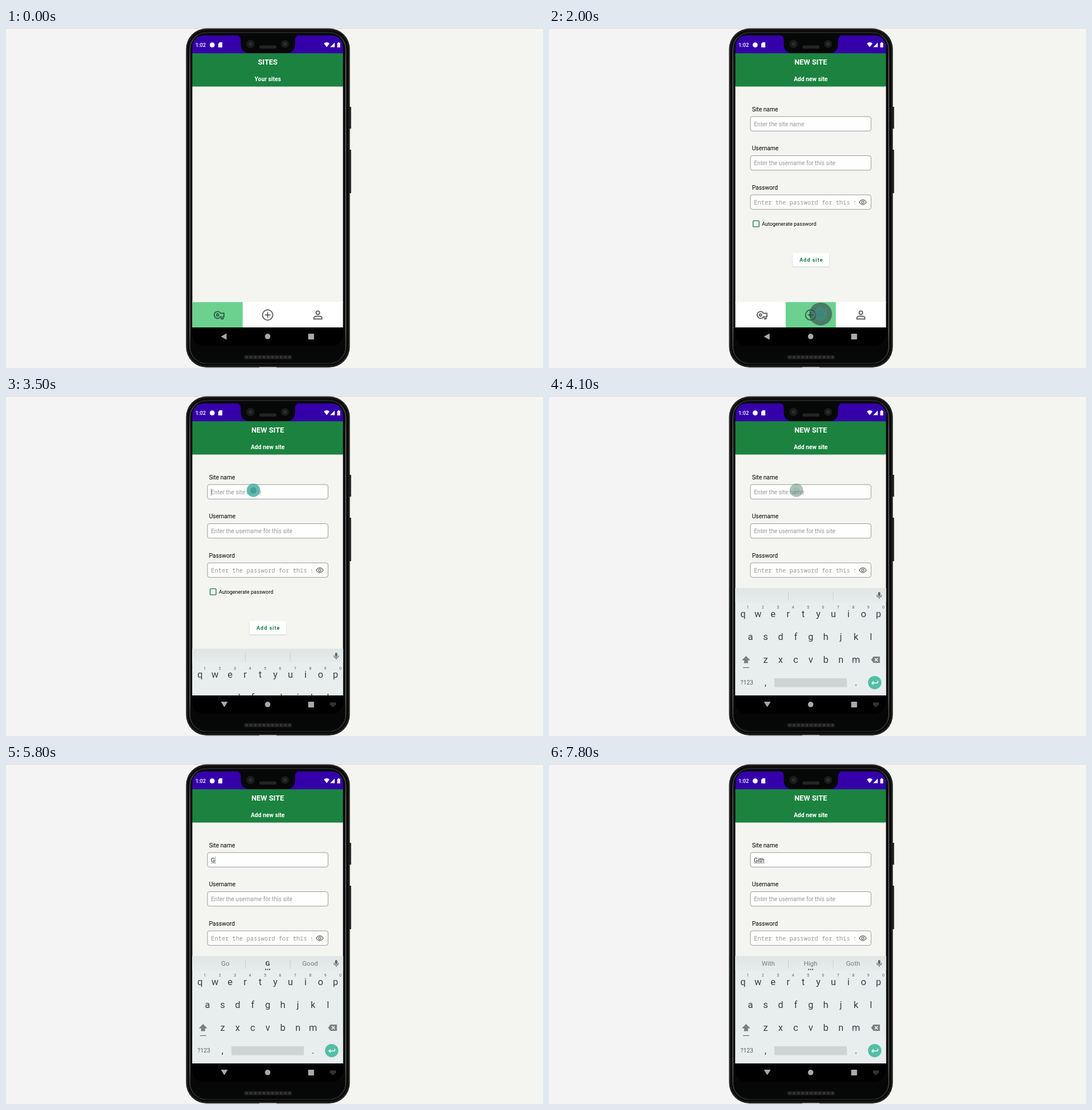
Animation of 941 by 595 pixels, one loop 8000 ms. Source, as an HTML page:

```html
<!DOCTYPE html>
<html lang="en">
<head>
<meta charset="utf-8">
<title>Adding a site</title>
<style>
  html, body { margin: 0; width: 100%; height: 100%; overflow: hidden; background: #f4f5f0; }
  svg { display: block; width: 941px; height: 595px; font-family: Roboto, sans-serif; }
  .mono { font-family: "Noto Sans Mono", monospace; }
  .icon { fill: none; stroke: #666867; stroke-width: 2; }
  .icon.active { stroke: #326246; }
</style>
</head>
<body>
<svg viewBox="0 0 941 595">
  <defs>
    <clipPath id="screenClip"><rect x="326.500" y="13" width="264" height="543" rx="20"/></clipPath>
    <clipPath id="contentClip"><path d="M326 103H591V524H326z"/></clipPath>
    <clipPath id="passwordClip"><path d="M355 294H536.500V316H355z"/></clipPath>
    <linearGradient id="strip" x2="0" y2="1">
      <stop stop-color="#e0e5e5"/><stop offset="1" stop-color="#e6ebeb"/>
    </linearGradient>
    <linearGradient id="rim" x2="0" y2="1">
      <stop stop-color="#3c3e3c"/><stop offset=".1" stop-color="#7d817d"/>
      <stop offset=".9" stop-color="#7d817d"/><stop offset="1" stop-color="#2a2c2a"/>
    </linearGradient>
  </defs>

  <path fill="#f4f4f4" d="M0 0H459V595H0z"/>
  <path fill="#d9d9d9" d="M0 0H941V1H0z"/>

  <g id="phone">
    <path fill="#222322" d="M602 138h2.700v38h-2.700zM602 213h2.700v76h-2.700z"/>
    <rect x="315.500" y=".7" width="287" height="593.300" rx="36" fill="#0a0b0a"/>
    <rect x="317" y="2.300" width="284" height="590" rx="34.500" fill="none" stroke="#2b2d2b" stroke-width="1.400"/>
    <rect x="322.300" y="8" width="273" height="579" rx="29" fill="#060707" stroke="url(#rim)" stroke-width="1.200"/>
    <rect x="417" y="572.500" width="84" height="7" rx="3" fill="#1d1e1d"/>
    <path d="M420 576H499" stroke="#343534" stroke-width="4" stroke-dasharray="4 3.500"/>
    <path fill="#eee" d="M444 593.500h30v1.500h-30z"/>
  </g>

  <g clip-path="url(#screenClip)">
    <path fill="#f4f5f1" d="M326 102H591V481H326z"/>
    <path fill="#3500aa" d="M326 13H591V45H326z"/>
    <path fill="#1b833f" d="M326 44.300H591V102.600H326z"/>
    <path fill="#000" d="M326 524H591V556H326z"/>
    <g id="statusIcons" fill="#fff">
      <circle cx="361.300" cy="29.600" r="4.400"/>
      <path d="M374.500 25h4.500v9h-7v-6.500z"/>
      <path d="M557 27q5-4 10 0l-5 6.500zM568 33.500l8-8v8zM580.500 26h1.500v-1h2v1h1.500v8h-5z"/>
    </g>
    <g id="headerText"></g>
    <g id="form"></g>
    <g id="tabs">
      <path fill="#fff" d="M326 479.600H591V524H326z"/>
      <rect id="activeTab" y="479.600" width="88" height="44.400" fill="#6bd18f"/>
      <g class="icon">
        <path d="M376.600 499.200A6 6 0 1 0 376.600 505.200H378V509H381V505.200H382.500V499.200z" transform="translate(-.6)"/>
        <circle cx="370.700" cy="502.200" r="2"/>
      </g>
      <g class="icon">
        <circle cx="458.500" cy="502.200" r="9"/>
        <path d="M453.500 502.200h10M458.500 497.200v10"/>
      </g>
      <g class="icon">
        <circle cx="546.500" cy="498.200" r="3"/>
        <path d="M539.500 509.200v-2q0-3 7-3t7 3v2z"/>
      </g>
    </g>
    <g clip-path="url(#contentClip)"><g id="keyboard"></g></g>
    <g fill="#aaa">
      <path id="back"/>
      <circle cx="458.500" cy="539.800" r="4.800"/>
      <rect x="529.500" y="535" width="10.300" height="10" rx="1"/>
      <path id="keyboardIcon" fill="none" stroke="#777" stroke-width="1.500" stroke-dasharray="1.500 .7"
        d="M568 537.500h10M568 540h10M570.500 542.500h5"/>
    </g>
  </g>

  <path fill="#060707" d="M404 12h110q-7.500 2-7.500 10v6q0 16-16 16h-63q-16 0-16-16v-6q0-8-7.500-10z"/>
  <g id="sensors">
    <g fill="#191b1a"><circle cx="428.500" cy="28" r="7.500"/><circle cx="489" cy="28" r="7"/></g>
    <g fill="#2b2e2c"><circle cx="428.500" cy="28" r="3.200"/><circle cx="489" cy="28" r="3.200"/></g>
    <rect x="444" y="30.500" width="30" height="5.500" rx="2" fill="#232423"/>
  </g>

  <g id="tabTap">
    <circle id="ripple" cx="476" cy="500.500" fill="#344a4b" fill-opacity=".62"/>
    <circle class="touch" cx="476" cy="500.500" r="12" fill="#34a9a4"/>
    <circle class="touch" cx="476" cy="500.500" r="5.500" fill="#287f8e"/>
  </g>
  <g id="fieldTap">
    <circle id="touchDisc" cx="433.500" cy="165" r="11.700"/>
    <circle id="touchCore" cx="433.500" cy="165" r="5.500" fill="#42978e"/>
  </g>
</svg>

<script>
const DURATION = 8000;
const $ = id => document.getElementById(id);
const clamp = v => Math.max(0, Math.min(1, v));
const progress = (t, from, to) => clamp((t - from) / (to - from));
const show = (el, visible) => el.style.display = visible ? '' : 'none';

function add(parent, tag, attrs, content = '') {
  const el = document.createElementNS('http://www.w3.org/2000/svg', tag);
  for (const name in attrs) el.setAttribute(name, attrs[name]);
  el.textContent = content;
  return parent.appendChild(el);
}

const text = (parent, x, y, size, content, attrs = {}) =>
  add(parent, 'text', { x, y, 'font-size': size, ...attrs }, content);
const centered = (parent, x, y, size, content, attrs) =>
  text(parent, x, y, size, content, { 'text-anchor': 'middle', ...attrs });

// Status bar and header
text($('statusIcons'), 332, 33, 9.2, '1:02', { 'font-weight': 500 });
const heading = { fill: '#fff', 'font-weight': 700 };
const title = centered($('headerText'), 458.7, 64.3, 12.84, '', heading);
const subtitle = centered($('headerText'), 458.7, 92.5, 10.27, '', heading);

// Form
const form = $('form');
const hint = { fill: '#999' };
function field(label, y) {
  text(form, 355.7, y, 10.27, label);
  add(form, 'rect', { x: 353, y: y + 9.2, width: 211.3, height: 25.3, rx: 3.5, fill: '#fefefd', stroke: '#999' });
}
field('Site name', 145.8);
field('Username', 214.3);
field('Password', 282.8);
const siteHint = text(form, 359.2, 171.5, 10.27, 'Enter the site name', hint);
const siteValue = text(form, 359, 171.5, 10.27, '', { fill: '#222' });
const valueUnderline = add(form, 'rect', { x: 359, y: 172.8, height: .8 });
const caret = add(form, 'rect', { y: 162, width: .8, height: 12.5, fill: '#777' });
text(form, 359.2, 240, 10.27, 'Enter the username for this site', hint);
text(form, 359.2, 308.8, 10.4, 'Enter the password for this site',
  { ...hint, class: 'mono', 'clip-path': 'url(#passwordClip)' });
add(form, 'path', { d: 'M543.5 304.800q6.300-8.500 12.600 0q-6.300 8.500-12.600 0z', fill: 'none', stroke: '#666', 'stroke-width': 1.2 });
add(form, 'circle', { cx: 549.8, cy: 304.8, r: 2, fill: 'none', stroke: '#666', 'stroke-width': 1.2 });
add(form, 'rect', { x: 357.6, y: 337.4, width: 10.5, height: 10.5, rx: 1, fill: 'none', stroke: '#247654', 'stroke-width': 1.4 });
text(form, 373, 346.2, 9, 'Autogenerate password');
add(form, 'rect', { x: 426.5, y: 395, width: 65, height: 23.8, rx: 2.5, fill: '#d5d6d3' });
add(form, 'rect', { x: 427, y: 394, width: 64, height: 23.5, rx: 2, fill: '#fff' });
text(form, 439, 409.2, 9, 'Add site', { fill: '#1b7a45', 'font-weight': 700, 'letter-spacing': 1 });

// Keyboard
const keyboard = $('keyboard');
const ink = { fill: '#37444a' };
add(keyboard, 'rect', { x: 326, y: 336, width: 265, height: 189, fill: '#e8eded' });
add(keyboard, 'rect', { x: 326, y: 336, width: 265, height: 25, fill: 'url(#strip)' });
add(keyboard, 'path', { d: 'M419.5 342v16M498 342v16', stroke: '#c9cfcf' });
add(keyboard, 'rect', { x: 576.6, y: 343, width: 4, height: 7.5, rx: 2, fill: '#5d686c' });
add(keyboard, 'path', { d: 'M574.600 348q0 4 4 4t4-4M578.600 352v3', fill: 'none', stroke: '#5d686c', 'stroke-width': 1.2 });

const letters = [];
['qwertyuiop', 'asdfghjkl', 'zxcvbnm'].forEach((row, line) =>
  [...row].forEach((key, i) => {
    const x = 458.7 + (i - (row.length - 1) / 2) * 26.4;
    letters.push(centered(keyboard, x, 386.9 + line * 40.2, 16.5, key, ink));
  }));
[...'1234567890'].forEach((digit, i) =>
  centered(keyboard, 348.3 + i * 26.4, 372.3, 7, digit, { fill: '#596468' }));
const shift = add(keyboard, 'path', { d: 'M345.300 455l7.500 7.500h-4v5h-7v-5h-4z' });
add(keyboard, 'path', { d: 'M340 475.300h11', stroke: '#6c7678', 'stroke-width': 1.2 });
add(keyboard, 'path', { d: 'M564.500 461.500l4-5.500h11.300v11h-11.300z', fill: '#778184' });
add(keyboard, 'path', { d: 'M570.800 458.800l5.400 5.400m0-5.400l-5.400 5.400', stroke: '#fff', 'stroke-width': 1.4 });
text(keyboard, 335.5, 505.2, 10.4, '?123', { fill: '#596468' });
centered(keyboard, 379.3, 507, 16.5, ',', ink);
centered(keyboard, 538, 507, 16.5, '.', ink);
add(keyboard, 'rect', { x: 395, y: 494, width: 127, height: 15.6, rx: 1, fill: '#ced3d3' });
add(keyboard, 'circle', { cx: 570.7, cy: 501.6, r: 11.7, fill: '#51c0a6' });
add(keyboard, 'path', { d: 'M576 498.300v4h-10M568.800 499.300l-3 3 3 3', fill: 'none', stroke: '#fff', 'stroke-width': 1.4 });

const suggestions = [384.3, 458.5, 532.8].map(x => centered(keyboard, x, 353.4, 11.6, ''));
const dots = add(keyboard, 'path', { d: 'M454 359.500h9', stroke: '#3d484c', 'stroke-width': 1.8, 'stroke-dasharray': '2 1.500' });

// Typed value and the suggestions it brings
const typing = [
  { at: 0, value: '', words: ['', '', ''] },
  { at: 5500, value: 'G', words: ['Go', 'G', 'Good'], exact: true },
  { at: 6200, value: 'Gi', words: ['Go', 'GI', 'To'], exact: true },
  { at: 6800, value: 'Git', words: ['Got', 'Git', 'To'], exact: true },
  { at: 7500, value: 'Gith', words: ['With', 'High', 'Goth'] }
];
const caretTimes = [[3200, 3700], [4200, 4700], [5200, 6000], [6200, 6700], [6800, 7300], [7500, 7800]];
const tabIcons = document.querySelectorAll('#tabs .icon');
const touches = document.querySelectorAll('.touch');

function drawPage(t) {
  const onForm = t >= 1500;
  title.textContent = onForm ? 'NEW SITE' : 'SITES';
  subtitle.textContent = onForm ? 'Add new site' : 'Your sites';
  show(form, onForm);
  $('activeTab').setAttribute('x', onForm ? 414.7 : 326.7);
  tabIcons.forEach((icon, i) => icon.classList.toggle('active', i === +onForm));
}

function drawTyping(t) {
  const { value, words, exact } = typing.findLast(step => t >= step.at);
  siteValue.textContent = value;
  show(siteHint, !value);
  const width = value ? siteValue.getComputedTextLength() : 0;
  valueUnderline.setAttribute('width', width);
  valueUnderline.setAttribute('fill', exact ? '#37a889' : '#666');
  caret.setAttribute('x', 359 + width);
  show(caret, caretTimes.some(([on, off]) => t >= on && t < off));
  suggestions.forEach((slot, i) => {
    const bold = exact && i === 1;
    slot.textContent = words[i];
    slot.setAttribute('font-weight', bold ? 700 : 400);
    slot.setAttribute('fill', bold ? '#37444a' : '#747d80');
  });
  show(dots, value);
}

function drawKeyboard(t) {
  const slide = 1 - (1 - progress(t, 3400, 3800)) ** 2;
  const upper = t >= 4700 && t < 5500;
  show(keyboard, slide > 0);
  keyboard.setAttribute('transform', `translate(0 ${189 * (1 - slide)})`);
  letters.forEach(key => key.textContent = upper ? key.textContent.toUpperCase() : key.textContent.toLowerCase());
  shift.setAttribute('fill', upper ? '#51c0a6' : '#778184');
  $('back').setAttribute('d', slide > 0 ? 'M376.500 535h12l-6 9.500z' : 'M386.500 534.500v11l-10-5.500z');
  show($('keyboardIcon'), slide > 0);
}

function drawTaps(t) {
  show($('tabTap'), t >= 1300 && t < 2400);
  $('ripple').setAttribute('r', 20 * progress(t, 1300, 1700));
  $('tabTap').setAttribute('opacity', 1 - progress(t, 2000, 2400));
  touches.forEach(el => el.setAttribute('opacity', .85 - .6 * progress(t, 1500, 2000)));

  const fade = progress(t, 3500, 4100);
  const mix = (from, to) => from + (to - from) * fade;
  show($('fieldTap'), t >= 3000 && t < 4400);
  $('touchDisc').setAttribute('fill', `rgba(${mix(70, 85)},${mix(178, 130)},${mix(161, 113)},${mix(.85, .48)})`);
  $('touchCore').setAttribute('opacity', mix(.8, .12));
  $('fieldTap').setAttribute('opacity', 1 - progress(t, 4100, 4400));
}

function frame() {
  const t = Math.floor(performance.now() % DURATION / 100) * 100;
  drawPage(t);
  drawTyping(t);
  drawKeyboard(t);
  drawTaps(t);
  requestAnimationFrame(frame);
}
frame();
</script>
</body>
</html>
```
